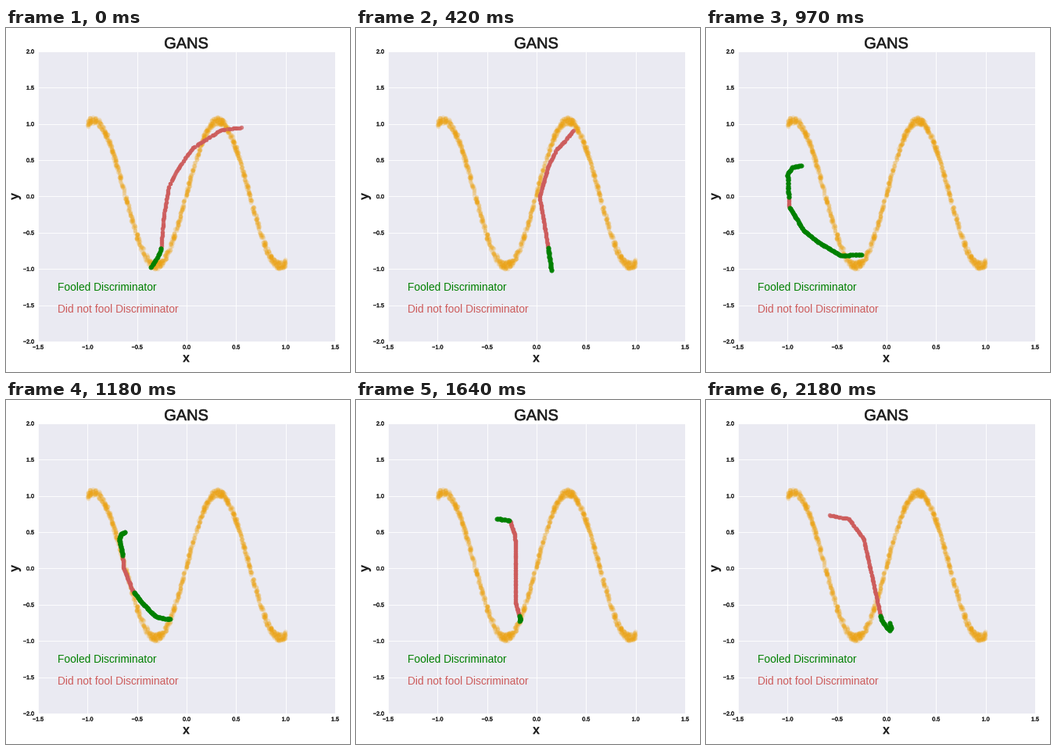
These frames come from a looping animation (440x440 px, 2.28 s). A matplotlib script:

```python
import numpy as np
import matplotlib.pyplot as plt
from matplotlib import patheffects
from matplotlib.animation import FuncAnimation

SIZE, DPI = 440, 100
LOOP, STEP = 2280, 10
PX = 72 / DPI                       # one pixel in points
LEFT, RIGHT, TOP, BOTTOM = 41, 421, 30, 401
INK = "#222222"

plt.rcParams["font.family"] = "Liberation Sans"
rng = np.random.default_rng(4)

# When each training step appears, in ms
TIMES = [0, 100, 210, 320, 420, 540, 760, 860, 970, 1180,
         1290, 1400, 1510, 1640, 1750, 1860, 2080, 2180]

# Generator curve at key steps: step, red share of its length, corners
KEYS = [
    (0, (0.12, 1),
     [(-.36, -.98), (-.26, -.75), (-.23, -.26), (-.18, .14),
      (-.095, .37), (.06, .67), (.35, .92), (.55, .95)]),
    (4, (0.16, 1),
     [(.15, -1.02), (.11, -.66), (.03, 0), (.12, .43),
      (.2, .65), (.3, .79), (.37, .91)]),
    (6, (0, 1),
     [(.83, -.6), (.585, -.44), (.31, .04), (.265, .26),
      (.27, .76), (.25, .9), (.2, .99)]),
    (8, (0.655, 0.715),
     [(-.25, -.8), (-.46, -.815), (-.69, -.63), (-.83, -.48),
      (-.985, -.14), (-1, .31), (-.955, .4), (-.86, .43)]),
    (11, (0, 0.79),
     [(0, -.5), (.045, -.49), (-.015, -.3), (.055, .33),
      (.04, .47), (-.05, .61), (-.15, .64)]),
    (15, (0.16, 1),
     [(-.34, -.95), (-.385, -.85), (-.41, -.67), (-.465, 0),
      (-.495, .71), (-.655, .74)]),
    (17, (0.18, 1),
     [(.03, -.75), (.05, -.82), (.03, -.86), (-.05, -.72),
      (-.21, .27), (-.23, .4), (-.38, .685), (-.575, .735)]),
]

COUNT = 150
SHARE = np.sort(np.clip(np.linspace(0, 1, COUNT)
                        + rng.normal(0, 0.004, COUNT), 0, 1))
SCALE = np.array([(RIGHT - LEFT) / 3, (BOTTOM - TOP) / 4])


def spread(corners):
    """Place the samples along a polyline by its length on screen."""
    pts = np.array(corners)
    length = np.hypot(*(np.diff(pts, axis=0) * SCALE).T)
    at = np.concatenate([[0], np.cumsum(length)]) / length.sum()
    return np.column_stack([np.interp(SHARE, at, pts[:, i]) for i in (0, 1)])


STEPS = [k[0] for k in KEYS]
REDS = np.array([k[1] for k in KEYS])
CURVES = [spread(k[2]) for k in KEYS]


def pose(step):
    """Sample positions and the mask of rejected samples at a step."""
    i = min(np.searchsorted(STEPS, step, side="right") - 1, len(KEYS) - 2)
    t = (step - STEPS[i]) / (STEPS[i + 1] - STEPS[i])
    pts = (1 - t) * CURVES[i] + t * CURVES[i + 1]
    lo, hi = (1 - t) * REDS[i] + t * REDS[i + 1]
    return pts, (SHARE >= lo - 1e-9) & (SHARE <= hi + 1e-9)


fig = plt.figure(figsize=(SIZE / DPI, SIZE / DPI), dpi=DPI, facecolor="white")
ax = fig.add_axes([LEFT / SIZE, 1 - BOTTOM / SIZE,
                   (RIGHT - LEFT) / SIZE, (BOTTOM - TOP) / SIZE],
                  facecolor="#eaeaf2")
ax.set(xlim=(-1.5, 1.5), ylim=(-2, 2), xticks=[], yticks=[])
for spine in ax.spines.values():
    spine.set_visible(False)


def label(x, y, text, size, weight=0.4, **kw):
    """Dark text placed in pixels from the top left corner."""
    heavy = [patheffects.withStroke(linewidth=weight * PX, foreground=INK)]
    fig.text(x / SIZE, 1 - y / SIZE, text, fontsize=size * PX, color=INK,
             path_effects=heavy, **kw)


def number(v):
    return f"{v:.1f}".replace("-", "\u2212")


for v in np.arange(-1.5, 1.6, 0.5):
    ax.axvline(v, color="white", lw=0.9 * PX, zorder=1)
    label(LEFT + (v + 1.5) * SCALE[0], 408, number(v), 7.2,
          ha="center", va="center_baseline")
for v in np.arange(-2, 2.1, 0.5):
    ax.axhline(v, color="white", lw=0.9 * PX, zorder=1)
    label(36, TOP + (2 - v) * SCALE[1], number(v), 7.2,
          ha="right", va="center_baseline")

label(230.5, 26, "GANS", 20, 0.6, ha="center", va="baseline")
label(230.5, 427, "x", 16, 0.8, ha="center", va="baseline")
label(11, 215.5, "y", 16, 0.8, ha="center", va="center", rotation=90)

# Real data: a sine with uniform noise above it
xs = rng.uniform(-1, 1, 1000)
ys = np.sin(5 * xs) + rng.uniform(0, 0.1, xs.size)


def dots(color, size, alpha, zorder):
    return ax.plot([], [], "o", color=color, ms=size * PX, mew=0,
                   alpha=alpha, zorder=zorder)[0]


dots("#eba312", 5.6, 0.22, 2).set_data(xs, ys)
red = dots("indianred", 5.4, 0.75, 3)
green = dots("green", 6, 0.85, 4)

ax.text(-1.3, -1.3, "Fooled Discriminator", color="green",
        fontsize=13.8 * PX, zorder=5)
ax.text(-1.3, -1.6, "Did not fool Discriminator", color="indianred",
        fontsize=13.8 * PX, zorder=5)


def update(n):
    step = np.searchsorted(TIMES, n * STEP, side="right") - 1
    pts, rejected = pose(step)
    red.set_data(*pts[rejected].T)
    green.set_data(*pts[~rejected].T)
    return red, green


anim = FuncAnimation(fig, update, frames=LOOP // STEP, interval=STEP,
                     init_func=lambda: update(0), repeat=True,
                     repeat_delay=0, blit=False)
plt.show()
```
